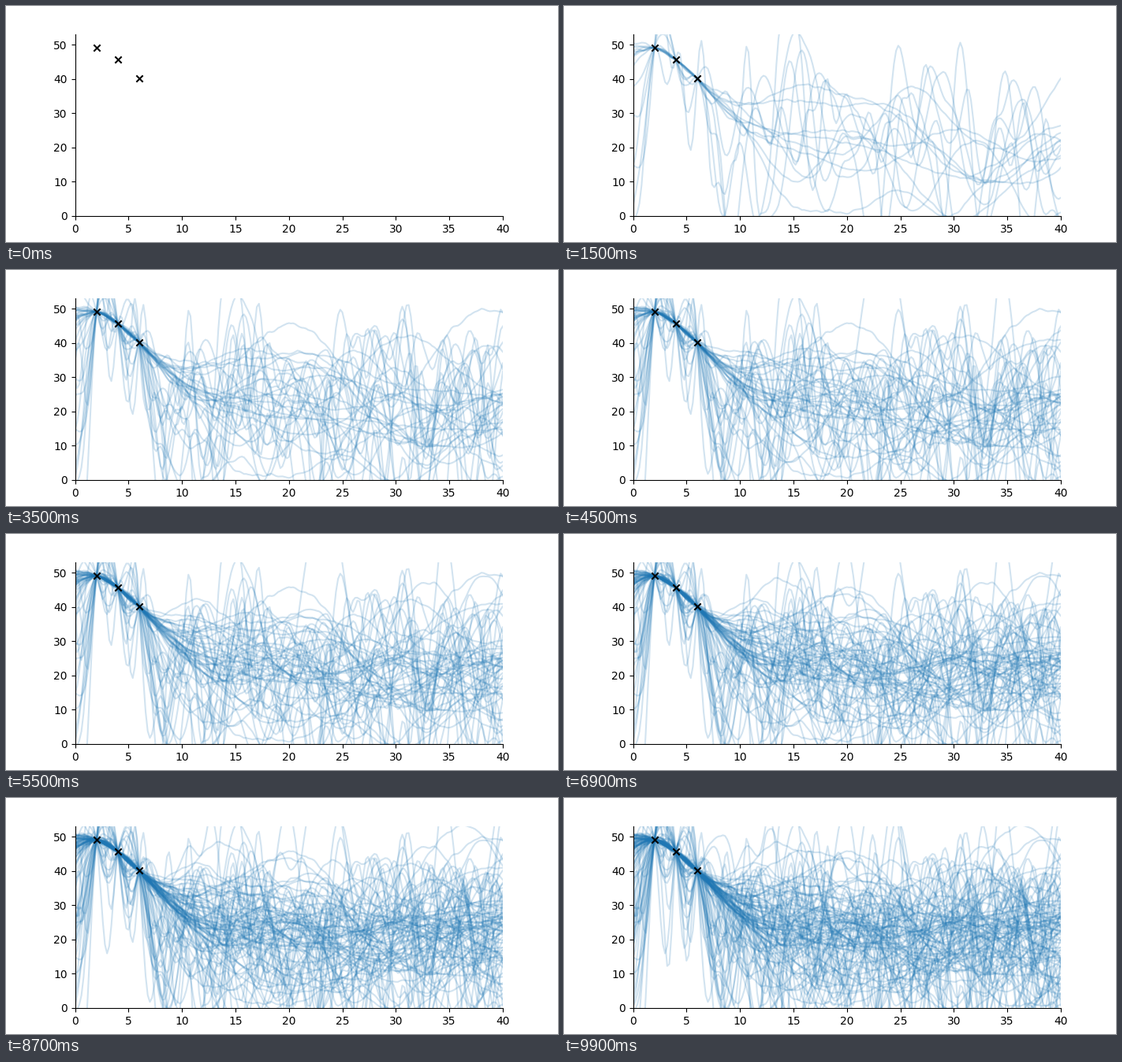
A matplotlib script that plays this animation: 700x300 px, repeating every 10 s.

```python
import numpy as np
import matplotlib.pyplot as plt
from matplotlib.animation import FuncAnimation

FRAMES = 100
rng = np.random.default_rng(7)

x = np.linspace(0, 40, 201)
obs_x = np.array([2, 4, 6])
obs_y = np.array([49.0, 45.6, 40.1])
obs = np.rint(obs_x * 5).astype(int)  # grid indices, step 0.2


def rbf(scale, sd):
    d = x[:, None] - x
    return sd**2 * np.exp(-(d**2) / (2 * scale**2))


def posterior_path(mean, scale, sd):
    """Draw a Gaussian process path that passes through the points."""
    cov = rbf(scale, sd) + rbf(0.35, 0.028 * sd) + 1e-3 * np.eye(x.size)
    path = mean + np.linalg.cholesky(cov) @ rng.standard_normal(x.size)
    gain = np.linalg.solve(cov[np.ix_(obs, obs)], obs_y - path[obs])
    return path + cov[:, obs] @ gain


def random_path():
    mean = rng.normal(21.5, 2.5)
    if rng.random() < 0.33:  # restless path
        return posterior_path(mean, rng.uniform(0.55, 1.4), rng.uniform(10, 18))
    return posterior_path(mean, rng.uniform(3, 6), rng.uniform(5, 15))


fig, ax = plt.subplots(figsize=(7, 3), dpi=100)
ax.set_xlim(0, 40)
ax.set_ylim(0, 53)
ax.spines[["top", "right"]].set_visible(False)
ax.scatter(obs_x, obs_y, marker="x", color="black", zorder=3)
lines = [
    ax.plot(x, random_path(), color="C0", alpha=0.2, visible=False)[0]
    for _ in range(FRAMES - 1)
]


def update(frame):
    for k, line in enumerate(lines):
        line.set_visible(k < frame)
    return lines


anim = FuncAnimation(fig, update, frames=FRAMES, interval=100, repeat=True)
plt.show()
```
